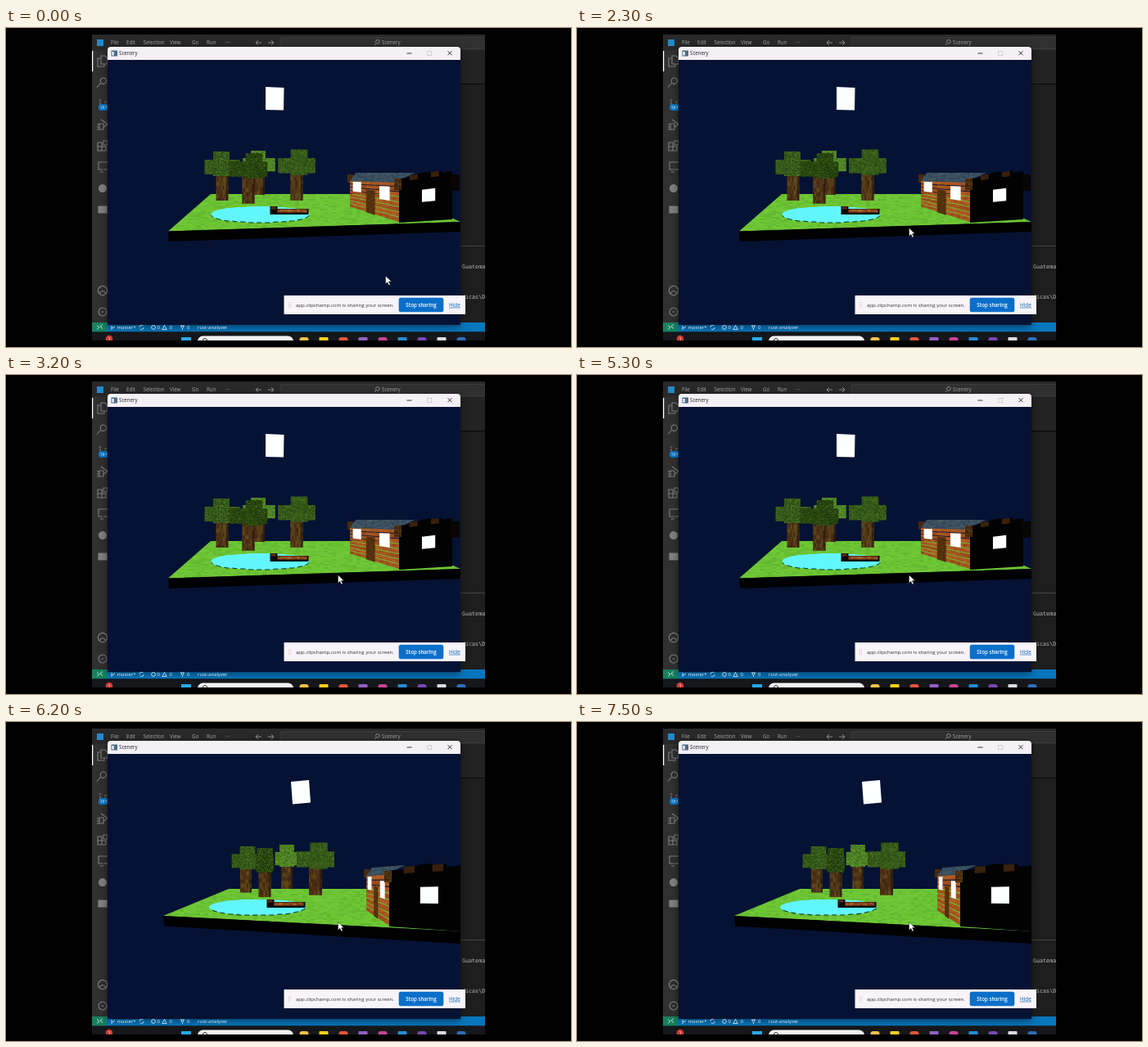
An HTML page with a canvas that plays this animation: 690 px wide and 390 px high, repeating every 8 s.

```html
<!DOCTYPE html>
<html lang="en">
<head>
<meta charset="utf-8">
<title>Scenery</title>
<style>
html, body { margin: 0; width: 100%; height: 100%; overflow: hidden; background: #000; }
svg, canvas { position: absolute; left: 0; top: 0; width: 690px; height: 390px; }
text { font-family: "Open Sans", "Noto Sans", sans-serif; font-size: 6.2px; }
.mono { font-family: "DejaVu Sans Mono", monospace; font-size: 6.7px; fill: #bbb; }
.icon { fill: none; stroke: #808080; stroke-width: 1.1; }
.thin { fill: none; stroke: #aaa; stroke-width: .8; }
.menu { fill: #aaa; }
.bar { fill: #e4eef6; font-size: 6px; }
#window { filter: drop-shadow(0 2px 5px rgba(0, 0, 0, .5)); }
</style>
</head>
<body>
<svg viewBox="0 0 690 390">
  <defs><clipPath id="desk"><rect x="105" y="8" width="480" height="374"/></clipPath></defs>
  <g clip-path="url(#desk)">
    <rect x="105" y="8" width="480" height="374" fill="#1e1e1e"/>
    <rect x="105" y="8" width="480" height="19" fill="#292929"/>
    <rect x="105" y="27" width="19" height="334" fill="#303031"/>
    <rect x="555" y="27" width="30" height="41" fill="#232324"/>
    <path d="M555 68.5h30" stroke="#080808"/>
    <path d="M555 266.5h30" stroke="#444"/>
    <rect x="111" y="14" width="8" height="8" fill="#2489ca"/>
    <g id="menu" class="menu"></g>
    <path class="thin" d="M312 18h-7m3-3l-3 3 3 3M320 18h7m-3-3l3 3-3 3"/>
    <rect x="335" y="11.5" width="262" height="14" rx="2.5" fill="#303030" stroke="#444" stroke-width=".7"/>
    <path class="thin" d="M450 21l2.300-2.500a2.300 2.300 0 1 1 .4.300"/>
    <text class="menu" x="459" y="20.300">Scenery</text>
    <rect x="105" y="28" width="1.300" height="25" fill="#fff"/>
    <g id="tools" class="icon"></g>
    <rect x="113" y="93" width="12" height="8" rx="4" fill="#0878c8"/>
    <text x="115" y="99" fill="#fff" style="font-size:4.800px">1K+</text>
    <text class="mono" x="557" y="294">Guatema</text>
    <text class="mono" x="557" y="331">dicas\D</text>

    <rect x="105" y="360" width="480" height="11.500" fill="#0876bd"/>
    <rect x="105" y="360" width="18" height="11.500" fill="#16825d"/>
    <rect x="105" y="371.500" width="480" height="11" fill="#15171b"/>
    <circle cx="126" cy="380" r="4.300" fill="#d63a2f"/><text class="bar" x="124.500" y="382">1</text>
    <rect x="214" y="378" width="12" height="10" fill="#27a9e8"/>
    <rect x="234" y="376.500" width="117" height="13" rx="6.500" fill="#f3f3f3"/>
    <circle cx="243" cy="382" r="2.500" fill="none" stroke="#333"/>
    <g id="dock"></g>

    <g id="window">
      <path d="M124 363V27q0-4 4-4h423q4 0 4 4v336z" fill="#061233"/>
      <path d="M124 39V27q0-4 4-4h423q4 0 4 4v12z" fill="#f5f0f5"/>
    </g>
    <rect x="128.500" y="27.500" width="7.500" height="7" fill="#4b6c88"/><path d="M129.500 29h2.200v4.500h-2.200z" fill="#fff"/>
    <text x="138" y="33.300" fill="#222">Scenery</text>
    <path d="M489.500 31h6M539.500 28.200l5 5m0-5l-5 5" stroke="#222" stroke-width=".9"/>
    <rect x="514.700" y="28.500" width="5" height="5" fill="none" stroke="#ccc" stroke-width=".9"/>

    <g class="thin" style="stroke:#e4eef6">
      <path d="M111 363.500l3 2.500-3 2.500M118 362.500l-3 2.500 3 2.500M129 364v5m0-2q3.500 0 3.500-2.500"/>
      <circle cx="165.500" cy="366" r="2.600" stroke-dasharray="6 2"/>
      <circle cx="180" cy="366" r="2.400"/>
      <path d="M193.500 363.500l2.700 5h-5.400zM213 364h5m-4 0q0 3 1.500 3t1.500-3m-1.500 3v2"/>
    </g>
    <text class="bar" x="135.500" y="368.300">master*</text><text class="bar" x="184.500" y="368.300">0</text>
    <text class="bar" x="199.500" y="368.300">0</text><text class="bar" x="221" y="368.300">0</text>
    <text class="bar" x="234" y="368.300">rust-analyzer</text>
  </g>
</svg>
<canvas id="early" width="690" height="390"></canvas>
<canvas id="late" width="690" height="390"></canvas>
<svg viewBox="0 0 690 390">
  <rect x="339.500" y="327" width="221.500" height="23" fill="#f8f4f9"/>
  <path d="M345.500 335.500v6M347.500 335.500v6" stroke="#d3a9a0" stroke-width=".9" stroke-dasharray="1 1.500"/>
  <text x="354" y="340.700" fill="#333" style="font-size:6.050px">app.clipchamp.com is sharing your screen.</text>
  <rect x="479.700" y="329.700" width="54.600" height="17.500" rx="2.500" fill="#0b6fca"/>
  <text x="507" y="340.700" fill="#fff" text-anchor="middle" style="font-weight:600">Stop sharing</text>
  <text x="541" y="340.700" fill="#0b62b4" text-decoration="underline" style="font-size:6.400px">Hide</text>
  <path id="cursor" d="M0 0v10l2.300-2.200 1.700 3.700 1.700-.8-1.700-3.600h3.200z" fill="#fff" stroke="#111" stroke-width=".5"/>
</svg>
<script>
const LOOP = 8000, MOVE = 500, TURN = 6200;
const BARK = '#4f3015', DARK = '#24420f', MID = '#33581a', LIGHT = '#4e8626';
const BLOCK = '#48290f', BLACK = '#020202', WHITE = '#fdffff';
const $ = id => document.getElementById(id);
const range = n => [...Array(n).keys()];

const menu = { File: 128, Edit: 147, Selection: 167.5, View: 200, Go: 227, Run: 245, '···': 268 };
$('menu').innerHTML = Object.entries(menu).map(([s, x]) => `<text x="${x}" y="20.3">${s}</text>`).join('');

// sidebar icons, each drawn around its own centre
const ring = r => `M${-r} 0a${r} ${r} 0 1 1 0 .01z`;
const tools = [
  'M-2-6h5l3 3v7h-8zM-3-3h-3v10h8v-3',
  'M-2 1l-5 5.500M-2 1a3.700 3.700 0 1 1 .5.500',
  'M-3-2v7m0-1q6-1 6.500-4M-4.500-4h3M2-2h3M-4.500 7h3',
  'M-2-6l8 5.500-5 4M-4-1h5v7h-5zM-7 0h3m-3 3h3m-3 3h3',
  'M-6-4h5v5h5v5h-10zM-6 1h5v5M1-6h5v5h-5z',
  'M6-6h-11v9h5m-3 3h4M1 3h5',
  ring(4.5), 'M-5-4h10v8h-10z'
];
const tool = (d, y) => `<path d="${d}" transform="translate(118 ${y})"/>`;
$('tools').innerHTML = tools.map((d, i) => tool(d, 40 + 26 * i)).join('') +
  tool(ring(5.6) + 'M-4 4q4-7 8 0', 321) + tool(ring(5) + 'M-1.500 0h3', 347);
for (const mark of [...$('tools').children].slice(6, 8)) mark.setAttribute('fill', '#808080');

const dock = ['#f2c14b', '#f4cf1b', '#e2553d', '#9460c4', '#c94395', '#258bd0', '#7a48b4', '#d9dce2', '#2e6eb5'];
$('dock').innerHTML = dock.map((c, i) =>
  `<rect x="${358.500 + 24 * i}" y="378" width="11" height="10" rx="${i % 2 ? 1 : 3}" fill="${c}"/>`).join('');

function paint(id, view) {
  const c = $(id).getContext('2d');
  let seed = 71;
  const rnd = () => (seed = (seed * 16807) % 2147483647) / 2147483647;
  c.beginPath();
  c.rect(124, 39, 431, 324);
  c.clip();

  function poly(pts, color, grain = 0, w = 1, h = 1) {
    c.save();
    c.beginPath();
    pts.forEach(p => c.lineTo(...p));
    c.closePath();
    c.fillStyle = color;
    c.fill();
    if (grain) {
      c.clip();
      const xs = pts.map(p => p[0]), ys = pts.map(p => p[1]);
      for (let y = Math.min(...ys); y < Math.max(...ys); y += h)
        for (let x = Math.min(...xs); x < Math.max(...xs); x += w) {
          const v = rnd() * 2 - 1;
          c.fillStyle = `rgba(${v < 0 ? '0,0,0' : '170,220,70'},${Math.abs(v) * grain})`;
          c.fillRect(x, y, w, h);
        }
    }
    c.restore();
  }
  const box = (x, y, w, h, ...look) => poly([[x, y], [x + w, y], [x + w, y + h], [x, y + h]], ...look);

  function tree(x, top, size, wing, lean, color) {
    const part = (mid, y, w, h, ...look) => box(mid - w * size / 2, top + y * size, w * size, h * size, ...look);
    part(x + lean, 27, 15, 33, BARK, .18, 2, 5);
    part(x + lean + 6 * size, 27, 2.500, 33, 'rgba(0,0,0,.35)');
    part(x + lean, 10, wing, 18, color, .25);
    part(x, 0, 20, 30, color, .25);
  }

  function pond(x, y, rx, ry) {
    const bend = v => Math.sign(v) * Math.abs(v) ** .8;
    const pts = range(48).map(i => {
      const a = i * Math.PI / 24;
      return [x + Math.round(rx * bend(Math.cos(a))), Math.round(y + ry * Math.sin(a))];
    });
    poly(pts, '#62f6fc');
    c.strokeStyle = '#062b20';
    c.setLineDash([6, 4]);
    c.beginPath();
    pts.slice(1, 24).forEach(p => c.lineTo(...p));
    c.stroke();
    c.setLineDash([]);
  }

  function boat(x, y) {
    box(x, y, 9, 10, '#0c0705');
    box(x + 8, y + 3, 39, 7, '#0c0705');
    box(x + 1, y + .5, 6, 3, '#5c2e14');
    box(x + 9, y + 3.500, 36, 4, '#9b4d20', .25, 3, 2);
  }

  // a wall spans two upright edges [x, top, bottom]; u and v run across and down it
  function wall(a, b) {
    const mix = (p, q, t) => p + (q - p) * t;
    const at = (u, v) => [mix(a[0], b[0], u), mix(mix(a[1], b[1], u), mix(a[2], b[2], u), v)];
    return (u, v, u2, v2, ...look) => poly([at(u, v), at(u2, v), at(u2, v2), at(u, v2)], ...look);
  }

  function house([l, k, r]) {
    const front = wall(l, k), side = wall(k, r);
    box(l[0] - 3, l[1] - 8, 7, 10, BLOCK);
    range(8).forEach(i => front(0, i / 8, 1, (i + 1) / 8 - .02, i % 2 ? '#a34e1d' : '#ad5722', .1, 4, 2));
    poly([[l[0], l[1]], [k[0] - 6, k[1] + 1], [k[0] + 20, k[1] - 11], [l[0] + 7, l[1] - 10]], '#384d62', .12, 3, 1);
    front(.33, .27, .51, 1, '#553010', .16);
    front(.06, .03, .23, .38, WHITE);
    front(.6, .13, .81, .5, WHITE);
    side(0, 0, 1, 1, BLACK);
    range(5).forEach(i => {
      const rise = .04 + .1 * Math.sin(Math.PI * (i + .5) / 5);
      side(i / 5, -rise, (i + 1) / 5, .03, BLACK);
      if (i % 2) side(i / 5, -rise, i / 5 + .15, 0, '#38210c');
    });
    box(r[0] - 2, r[1], 11, 20, '#080503');
    box(k[0] - 6, k[1] - 4, 9, 14, BLOCK, .15, 2, 2);
    side(.43, .26, .68, .55, WHITE);
  }

  poly(view.moon, WHITE);
  const [left, back, far, right] = view.ground;
  poly([left, back, far, right], '#6cc634', .08, 5, 2);
  poly([left, right, [right[0], right[1] + view.depth], [left[0] + 1, left[1] + 12.5]], '#000');
  pond(...view.pond);
  boat(...view.boat);
  view.trees.forEach(t => tree(...t));
  house(view.house);
}

paint('early', {
  moon: [[317, 72], [339.5, 73], [339, 100.5], [317, 100]],
  ground: [[198, 248.5], [250, 203], [478, 203], [555, 237]],
  depth: 12,
  pond: [310.5, 228, 60, 9.8],
  boat: [322.5, 218],
  trees: [[308, 150, .9, 44, 1, LIGHT], [263, 151, 1, 43, 1, MID], [358, 148.5, 1.04, 44, -3, MID], [303, 153, 1.03, 45, -7, DARK]],
  house: [[420, 187, 219], [480, 188, 238], [545, 179, 234]]
});
paint('late', {
  moon: [[348, 73], [370, 71], [372, 98.5], [350, 100.5]],
  ground: [[192, 237], [272, 204], [470, 204], [555, 256]],
  depth: 15,
  pond: [307, 226.5, 59, 9.5],
  boat: [318.5, 217],
  trees: [[343, 150, .9, 32, 0, LIGHT], [295, 152, .94, 37, -2, MID], [382, 147.5, 1.07, 43, -4, MID], [316, 154, 1, 22, 0, DARK]],
  house: [[440, 188, 231], [468, 186, 250], [556, 181, 256]]
});

function draw(now) {
  const t = now % LOOP;
  $('early').style.visibility = t < TURN ? 'visible' : 'hidden';
  $('late').style.visibility = t < TURN ? 'hidden' : 'visible';
  $('cursor').setAttribute('transform', t < MOVE ? 'translate(463.5 303)' : 'translate(405.5 244.5)');
  requestAnimationFrame(draw);
}
draw(performance.now());
</script>
</body>
</html>
```
